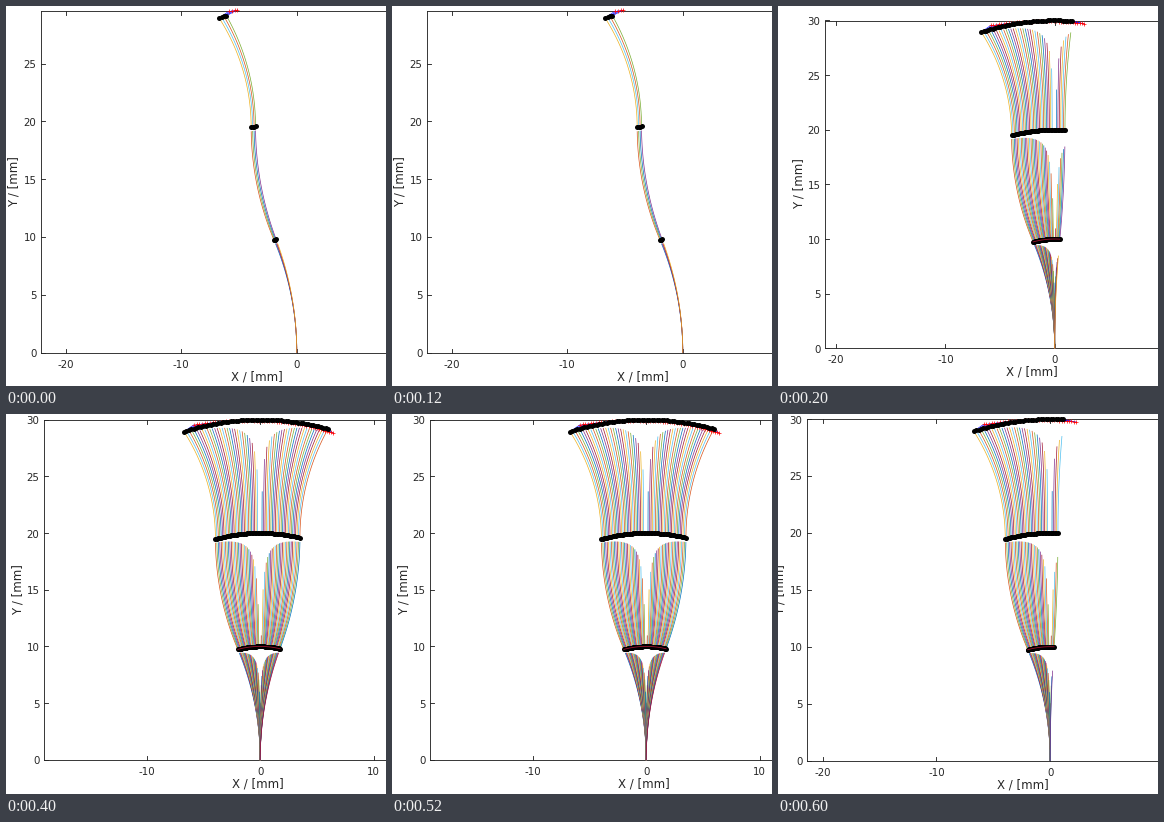
These frames come from a looping animation (380x380 px, 0.8 s). A matplotlib script:

```python
import numpy as np
import matplotlib.pyplot as plt
from matplotlib.animation import FuncAnimation

SIZE = 380
PT = 0.72  # points per pixel at 100 dpi
COLORS = ["#0072BD", "#D95319", "#EDB120", "#7E2F8E",
          "#77AC30", "#4DBEEE", "#A2142F"]
BEND = (0.4, -0.4, 0.57)  # full bend of each section, radians
SECTION = 10.0            # section length, mm
STEP = 0.0325             # change of bend between poses
CUT = 0.0145              # angle left undrawn at the end of each arc

# origin x, origin y, pixels per mm, left edge, top edge, number of poses
VIEWS = [
    (290.8, 346.5, 11.56, 34.5, 4.5, 4),
    (276.7, 342.3, 10.93, 46.5, 14.5, 39),
    (254.2, 345.8, 11.34, 37.5, 6.0, 59),
    (272.2, 346.5, 11.38, 28.5, 5.0, 37),
]
X_LABELS = [(251, 371), (254, 366), (252, 370), (245, 371)]
Y_LABELS = [(8, 176), (21, 178), (12, 176), (2, 176)]

fig = plt.figure(figsize=(3.8, 3.8), dpi=100, facecolor="white")
ax = fig.add_axes([0, 0, 1, 1])


def arc(start, heading, bend, share=1):
    """Points on a circular arc, cut to the given share of its length."""
    angle = heading + bend * np.linspace(0, share, 24)
    radius = SECTION / bend
    x = start[0] + radius * (np.sin(angle) - np.sin(heading))
    y = start[1] - radius * (np.cos(angle) - np.cos(heading))
    return x, y


def goal_offset(s):
    dx = 0.87 + 0.19 * (s + 1) - 0.59 * (s + 1) * (s - 0.2)
    dy = 0.6 - 0.685 * (s + 1) + 0.27 * (s + 1) * (s - 0.24)
    return np.array([dx, dy])


def draw_axes(x0, y0, scale, left, top):
    def rule(xs, ys):
        ax.plot(xs, ys, color="#262626", lw=0.9 * PT, zorder=1)

    rule([left, left], [top, y0])
    rule([left, SIZE], [y0, y0])
    rule([left, SIZE], [top, top])
    for value in (-20, -10, 0, 10):
        x = x0 + value * scale
        if left < x < SIZE:
            rule([x, x], [y0, y0 - 4])
            rule([x, x], [top, top + 4])
            ax.text(x, y0 + 12, str(value), ha="center", va="center",
                    fontsize=10.3 * PT, color="#262626")
    for value in range(0, 31, 5):
        y = y0 - value * scale
        if y > top - 2:
            rule([left, left + 4], [y, y])
            ax.text(left - 4, y + 0.5, str(value), ha="right",
                    va="center_baseline", fontsize=10.3 * PT, color="#262626")


def draw_poses(x0, y0, scale, count):
    def to_px(x, y):
        return x0 + np.asarray(x) * scale, y0 - np.asarray(y) * scale

    joints = [[], [], []]
    goals = []
    for i in range(count):
        s = -1 + STEP * i
        start, heading = np.zeros(2), np.pi / 2
        for j, full in enumerate(BEND):
            bend = -s * full
            share = max(0, 1 - CUT / abs(bend))
            ax.plot(*to_px(*arc(start, heading, bend, share)),
                    color=COLORS[(3 * i + j) % 7], lw=0.7 * PT, zorder=2)
            xs, ys = arc(start, heading, bend)
            start = np.array([xs[-1], ys[-1]])
            heading += bend
            joints[j].append(start)
        goal = start + goal_offset(s)
        goals.append(goal)
        ax.plot(*to_px(*np.array([start, goal]).T), color="blue",
                lw=0.6 * PT, zorder=2)

    ax.plot(*to_px(*np.array(goals).T), "+", color="red", ms=5 * PT,
            mew=0.7 * PT, zorder=3)
    for points in joints:
        ax.plot(*to_px(*np.array(points).T), "o", color="black",
                ms=5 * PT, mew=0, zorder=4)
    if count > 10:
        ax.plot(*to_px(*np.array(joints[0]).T), color="#A2142F",
                lw=0.8 * PT, zorder=5)


def draw(frame):
    ax.clear()
    ax.set(xlim=(0, SIZE), ylim=(SIZE, 0))
    ax.axis("off")
    x0, y0, scale, left, top, count = VIEWS[frame]
    draw_axes(x0, y0, scale, left, top)
    draw_poses(x0, y0, scale, count)
    style = dict(ha="center", va="center", fontsize=11.7 * PT, color="#262626")
    ax.text(*X_LABELS[frame], "X / [mm]", **style)
    ax.text(*Y_LABELS[frame], "Y / [mm]", rotation=90, **style)
    return []


anim = FuncAnimation(fig, draw, frames=len(VIEWS), interval=200,
                     init_func=lambda: [], repeat=True)
plt.show()
```
